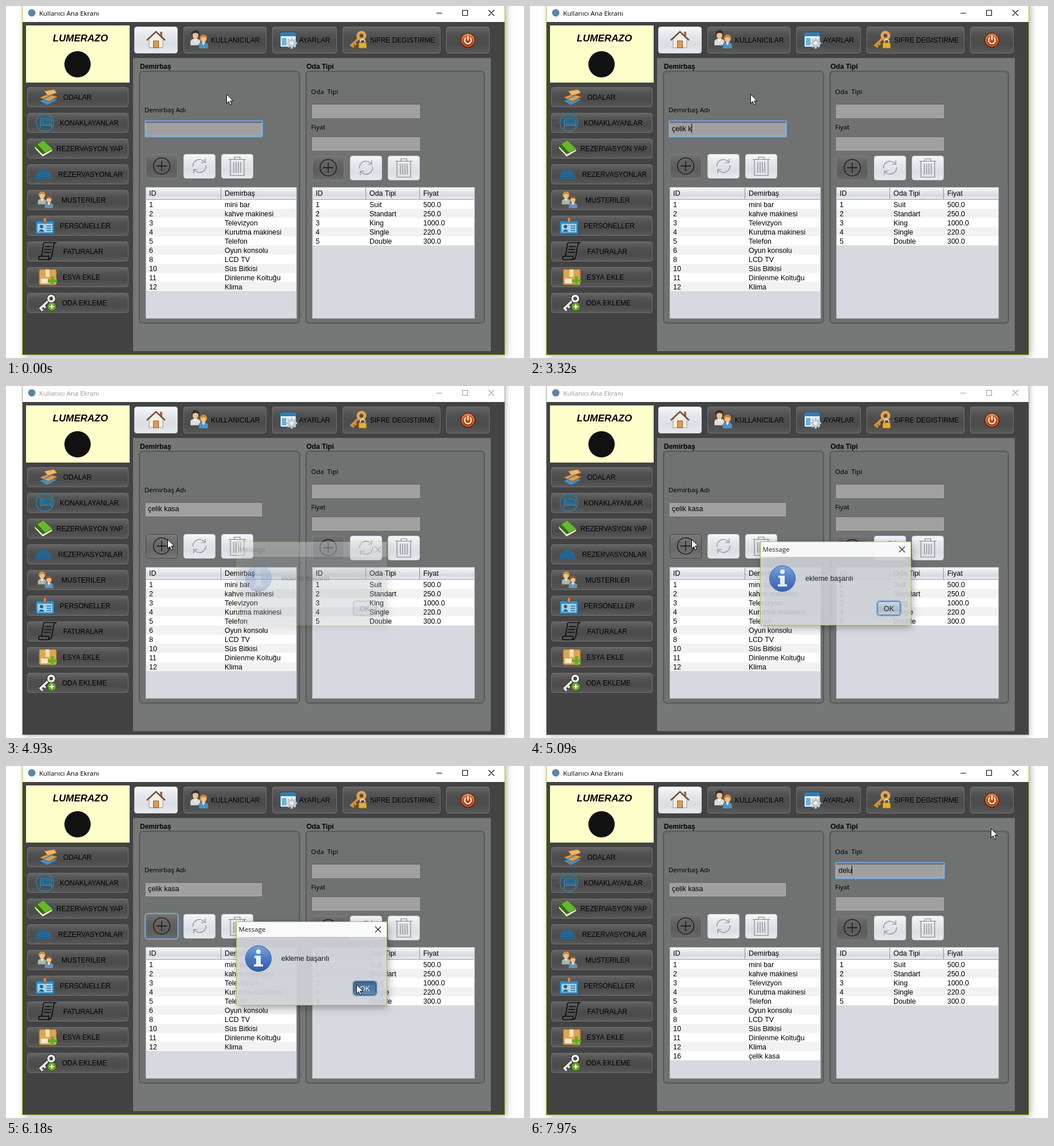
These frames come from a looping animation (905x616 px, 8 s). An HTML page with a canvas:

```html
<!DOCTYPE html>
<html lang="tr">
<head>
<meta charset="utf-8">
<title>Kullanıcı Ana Ekranı</title>
<style>
  html, body { margin: 0; width: 100%; height: 100%; overflow: hidden; background: #fff; }
  canvas { display: block; }
</style>
</head>
<body>
<canvas id="stage" width="905" height="616"></canvas>
<script>
const ctx = document.getElementById('stage').getContext('2d');
const LOOP = 8000, STEP = 78, PHASE = 20;
const ARIAL = '"Liberation Sans", Arial, sans-serif';
const BUTTON_FONT = '12px ' + ARIAL, TABLE_FONT = '12.4px ' + ARIAL, BOLD = 'bold 12px ' + ARIAL;
const LABEL_FONT = '11.4px "Noto Sans", sans-serif', TITLE_FONT = '11.5px "Open Sans", sans-serif';

// ---------- drawing helpers ----------
function text(str, x, y, font = TABLE_FONT, color = '#000') {
  ctx.font = font;
  ctx.fillStyle = color;
  ctx.fillText(str, x, y);
}
function rect(x, y, w, h, color) {
  ctx.fillStyle = color;
  ctx.fillRect(x, y, w, h);
}
function frame(x, y, w, h, color) {
  ctx.strokeStyle = color;
  ctx.lineWidth = 1;
  ctx.strokeRect(x + .5, y + .5, w - 1, h - 1);
}
function path(d, fill, stroke, width = 1) {
  const p = new Path2D(d);
  if (fill) { ctx.fillStyle = fill; ctx.fill(p); }
  if (stroke) { ctx.strokeStyle = stroke; ctx.lineWidth = width; ctx.stroke(p); }
}
function circle(x, y, r, fill, stroke, width) {
  path(`M${x - r} ${y}a${r} ${r} 0 1 1 ${2 * r} 0a${r} ${r} 0 1 1 ${-2 * r} 0z`, fill, stroke, width);
}
function rounded(x, y, w, h, r, fill, stroke, width = 1) {
  ctx.beginPath();
  ctx.roundRect(x, y, w, h, r);
  if (fill) { ctx.fillStyle = fill; ctx.fill(); }
  if (stroke) { ctx.strokeStyle = stroke; ctx.lineWidth = width; ctx.stroke(); }
}
function shade(y, h, ...colors) {
  const g = ctx.createLinearGradient(0, y, 0, y + h);
  colors.forEach((c, i) => g.addColorStop(i / (colors.length - 1), c));
  return g;
}
function at(x, y, draw) {
  ctx.save();
  ctx.translate(x, y);
  draw();
  ctx.restore();
}

// ---------- widgets ----------
const SKINS = {
  dark: [['#666', '#505050', '#4b4b4b', '#5a5a5a'], '#727272'],
  tool: [['#747474', '#626262', '#5d5d5d', '#6a6a6a'], '#808080'],
  hover: [['#7c7c7c', '#6d6d6d', '#686868', '#767676'], '#484848'],
  light: [['#f7f8fa', '#e5e7ec', '#dbdee4', '#e8eaef'], '#cfd2d8'],
  primary: [['#dbe3ee', '#b2c1d2', '#a8b9cc', '#cad7e5'], '#4a6484'],
  pressed: [['#31557c', '#3f6a98', '#426f9e', '#5c8bb8'], '#1c3450']
};
function button(x, y, w, h, skin = 'dark') {
  const [colors, edge] = SKINS[skin];
  rounded(x + .5, y + .5, w - 1, h - 1, 4, shade(y, h, ...colors), edge);
}
function focusRing(x, y, w, h, r) {
  rounded(x - 1, y - 1, w + 2, h + 2, r, null, '#75a3d0', 2);
}
function field(x, y, w, focused) {
  rect(x, y, w, 25, '#a0a0a0');
  frame(x, y, w, 25, '#b0b2b0');
  rect(x, y, w, 1, '#5e615f');
  rect(x, y + 1, w, 1, '#8b8d8b');
  if (focused) focusRing(x, y - 1, w, 26, 1);
}
function typed(str, x, baseline, caret) {
  text(str, x, baseline);
  if (caret) rect(Math.round(x + ctx.measureText(str).width), baseline - 13, 1, 16, '#000');
}
function group(x, w, title) {
  rounded(x + 1, 114, w - 2, 441, 6, '#6f7271', '#585b59', 2);
  rounded(x + 2.5, 115.5, w - 5, 438, 5, null, '#676a68');
  text(title, x + 2, 110, BOLD);
}
function table(x, w, columns, rows) {
  rect(x, 317, w, 230, '#d6d9e0');
  rect(x, 317, w, 22, shade(317, 22, '#fafbfc', '#e6e8ec', '#d7dae0', '#eef0f3'));
  rows.forEach((_, i) => rect(x, 339 + 16 * i, w, 16, i % 2 ? '#f2f2f2' : '#fff'));
  columns.forEach(([dx, title], c) => {
    if (c) rect(x + dx - 1, 318, 1, 21, '#8e929b');
    text(title, x + dx + 6, 332);
    rows.forEach((row, i) => text(row[c], x + dx + 6, 352 + 16 * i));
  });
  rect(x, 338, w, 1, '#969aa2');
  frame(x, 317, w, 230, '#c3c6cc');
}
function tools(x, y, skin, focused) {
  button(x, y, 56, 43, skin);
  button(x + 66, y, 56, 43, 'light');
  button(x + 132, y, 56, 43, 'light');
  if (focused) focusRing(x, y, 56, 43, 5);
  at(x + 28, y + 21, () => {
    circle(0, 0, 14.3, null, '#111', 1.3);
    path('M-9 0H9M0 -9V9', null, '#111', 1.3);
  });
  at(x + 94, y + 21, () => {
    path('M-11.5 1A11.5 11.5 0 0 1 9 -7M11.5 -1A11.5 11.5 0 0 1 -9 7M10 -13V-6H3M-10 13V6H-3', null, '#888', 1.2);
  });
  at(x + 160, y + 21, () => {
    path('M-15 -11.500H15M-5 -12V-15.500H5V-12M-12 -11V16.500H12V-11M-6 -7V12M-2 -7V12M2 -7V12M6 -7V12', null, '#858585', 1.2);
  });
}

// ---------- icons ----------
function person(x, y, hair, coat, s = 1) {
  at(x, y, () => {
    ctx.scale(s, s);
    path('M-9 17V10Q-8 5 0 5Q8 5 9 10V17Z', coat, '#555', .6);
    path('M-3 5L0 11L3 5Z', '#f4f4f4');
    circle(0, -3, 7, hair);
    path('M-5 -3Q0 -7 5 -3V1Q3 6 0 6Q-3 6 -5 1Z', '#f0bf8f');
  });
}
function plusBadge(x, y) {
  circle(x, y, 7.5, '#6aa323', '#355b10', .8);
  path(`M${x - 4} ${y}h8M${x} ${y - 4}v8`, null, '#fff', 2);
}
function drawTopIcons() {
  path('M269 45h4v9h-4z', '#9b6b4d');
  path('M250 58L262 46L274 58V73H250Z', '#f5eee4', '#9c9489');
  path('M246 60L262 45L278 60', null, '#71523e', 2.6);
  path('M257.500 61h9v12h-9z', '#e09a55', '#8c5a2e');

  person(331, 52, '#34302d', '#dcddde');
  person(345, 59, '#c78a3c', '#4b95c6', .9);

  rounded(479, 46, 28, 26, 2, '#f2f5f7', '#1f4e6f', 1.5);
  rect(480, 47, 26, 6, '#2f7faf');
  rect(482, 56, 8, 13, '#6bb1d8');
  for (let i = 0; i < 8; i++) at(499, 65, () => {
    ctx.rotate(i * Math.PI / 4);
    rect(-2, -9.5, 4, 5, '#c3c8cb');
  });
  circle(499, 65, 5, '#eceeef', '#c3c8cb', 3.5);

  path('M617 56L602 70M604 68l4 4M608 64l4 4', null, '#d9912f', 4);
  circle(621, 52, 6, null, '#e8a548', 5);
  path('M619 65V61Q623 55 627 61V65', null, '#d5d5d5', 2);
  rounded(616, 64, 14, 10, 1, '#e4ae35', '#80571a');

  circle(807, 60, 12.5, shade(47, 26, '#e08a50', '#c04d18', '#8f300a'), '#5f240c', 1.5);
  circle(807, 60, 10.5, null, '#eba274', .8);
  path('M803.500 55.500A5.800 5.800 0 1 0 810.500 55.500M807 52V60', null, '#fff', 2);
}
function drawSideIcons() {
  path('M58 166L76 159L90 164L72 174Z', '#4c8db5', '#27587a');
  path('M59 160L74 154L90 159L74 167Z', '#e79c46', '#8d5824');
  path('M67 149L84 146L89 152L73 157Z', '#f0b668', '#a66a2f');
  path('M65 163L80 156', null, '#4c8db5', 2);

  circle(68, 204, 15.5, null, '#2f7b9f', 1.8);
  path('M60 195V213M60 209H80V213', null, '#2f7b9f', 2);
  path('M63 198Q70 195 80 199V207H63Z', '#286884', '#2f7b9f', 1.5);

  path('M50 245V249L64 264L81 254V250L64 259Z', '#e8e6d7', '#34501d');
  path('M50 245L65 235L81 250L64 259Z', '#68b72e', '#3e7917');
  path('M50 245L55 242L69 257L64 259Z', '#3b6c18');

  path('M52 300Q53 287 65 287Q78 287 79 300Z', '#28658f');
  path('M50 302H81', null, '#28658f', 2.5);
  circle(65, 285, 2, '#28658f');

  person(63, 333, '#c79143', '#a9b7a5', .85);
  person(75, 340, '#8a5a34', '#6d93b3', .82);

  rounded(52, 376, 32, 23, 2, '#2e8fc7', '#1d5b80');
  rect(55, 381, 26, 15, '#9ed0ea');
  circle(62, 386, 3, '#2e5f7e');
  path('M57 395Q62 387 67 395Z', '#2e5f7e');
  path('M71 385h8M71 389h8M71 393h8', null, '#2e6e96', 1.6);
  rounded(65.500, 370, 5, 9, 2, '#e1813d', '#8a451b');

  path('M67 414H87Q83 416 83 421L80 438Q79 444 73 444H58Q55 440 59 438H75Q74 442 76 444M67 414Q65 415 65 420L62 438M68 421H80M67 426H79M66 431H78', null, '#0b0b0b', 1.6);

  rounded(58, 461, 30, 27, 2, '#dda64f', '#9c6a26');
  rect(69, 461, 7, 13, '#f4dfb0');
  rect(61, 477, 12, 8, '#f2ead8');
  path('M81 473v16M73 481h16', null, '#62ad2c', 5);

  path('M76 514L59 530M60 529l4 4M65 524l4 4', null, '#222', 6);
  path('M76 514L59 530M60 529l4 4M65 524l4 4', null, '#e6e6e6', 4);
  circle(79, 512, 5, null, '#222', 6);
  circle(79, 512, 5, null, '#ededed', 4);
  plusBadge(80, 526);
}

// ---------- data ----------
const SIDE = [['ODALAR', 100], ['KONAKLAYANLAR', 94], ['REZERVASYON YAP', 88], ['REZERVASYONLAR', 91],
  ['MUSTERILER', 97], ['PERSONELLER', 94], ['FATURALAR', 100], ['ESYA EKLE', 99], ['ODA EKLEME', 98]];
const ITEMS = [['1', 'mini bar'], ['2', 'kahve makinesi'], ['3', 'Televizyon'], ['4', 'Kurutma makinesi'],
  ['5', 'Telefon'], ['6', 'Oyun konsolu'], ['8', 'LCD TV'], ['10', 'Süs Bitkisi'],
  ['11', 'Dinlenme Koltuğu'], ['12', 'Klima']];
const ROOMS = [['1', 'Suit', '500.0'], ['2', 'Standart', '250.0'], ['3', 'King', '1000.0'],
  ['4', 'Single', '220.0'], ['5', 'Double', '300.0']];

const ITEM_TYPING = [[0, ''], [1610, 'ç'], [1670, 'çe'], [1840, 'çel'], [1990, 'çeli'], [2230, 'çelik'],
  [2310, 'çelik '], [2630, 'çelik a'], [3000, 'çelik '], [3320, 'çelik k'], [3400, 'çelik ka'],
  [3470, 'çelik kas'], [3550, 'çelik kasa']];
const ROOM_TYPING = [[0, ''], [7590, 'd'], [7670, 'de'], [7750, 'del'], [7970, 'delu']];
const POINTER = [[3686, 385, 154], [4232, 253, 290], [4388, 253, 290], [4544, 282, 268], [5168, 282, 268],
  [5636, 612, 382], [6182, 612, 382], [6494, 575, 216], [6728, 584, 163], [7118, 584, 163], [7196, 660, 163],
  [7274, 660, 163], [7352, 888, 73], [7430, 888, 73], [7508, 805, 109]];

// ---------- timing ----------
const clamp = v => Math.max(0, Math.min(1, v));
const between = (t, a, b) => t >= a && t < b;
const latest = (keys, t) => keys.findLast(k => t >= k[0])[1];
function pointerAt(t) {
  const i = POINTER.findIndex(k => k[0] > t);
  if (i === 0) return POINTER[0].slice(1);
  if (i < 0) return POINTER.at(-1).slice(1);
  const [t0, x0, y0] = POINTER[i - 1], [t1, x1, y1] = POINTER[i];
  const k = (t - t0) / (t1 - t0);
  return [x0 + (x1 - x0) * k, y0 + (y1 - y0) * k];
}

// ---------- scene ----------
function drawWindow(active) {
  rect(0, 0, 905, 616, '#fff');
  ctx.save();
  ctx.shadowColor = active ? 'rgba(0,0,0,.32)' : 'rgba(0,0,0,.22)';
  ctx.shadowBlur = active ? 11 : 8;
  ctx.shadowOffsetX = 3;
  ctx.shadowOffsetY = 3;
  rect(29, -20, 842, 630, '#fff');
  ctx.restore();
  rect(29, 28, 842, 582, '#434343');
  frame(28, -2, 844, 613, active ? '#a9c52f' : '#a5a5a5');
  const ink = active ? '#000' : '#999';
  circle(45, 12, 6.5, '#5c86a8');
  text('Kullanıcı Ana Ekranı', 58, 17, TITLE_FONT, ink);
  path('M752 12.500h10M797.500 7.500h9v9h-9zM843 7l10 10M853 7l-10 10', null, ink, 1.1);
}
function drawBrand() {
  rect(35, 34, 181, 100, '#ffffcb');
  ctx.textAlign = 'center';
  text('LUMERAZO', 130, 62, 'italic bold 17px ' + ARIAL);
  ctx.textAlign = 'left';
  circle(125, 102, 23, '#111');
}
function drawNavigation() {
  button(224, 36, 76, 47, 'light');
  [[310, 145], [465, 113], [588, 171], [769, 76]].forEach(([x, w]) => button(x, 36, w, 47));
  text('KULLANICILAR', 358, 64, BUTTON_FONT);
  text('AYARLAR', 512, 64, BUTTON_FONT);
  text('SIFRE DEGISTIRME', 636, 64, BUTTON_FONT);
  SIDE.forEach(([label, x], i) => {
    button(37, 142 + 45 * i, 177, 35);
    text(label, x, 164 + 45 * i, BUTTON_FONT);
  });
  drawTopIcons();
  drawSideIcons();
}
function drawDialog(alpha, pressed) {
  ctx.save();
  ctx.globalAlpha = alpha;
  ctx.save();
  ctx.shadowColor = 'rgba(0,0,0,.4)';
  ctx.shadowBlur = 13;
  ctx.shadowOffsetX = 2;
  ctx.shadowOffsetY = 4;
  rect(403, 273, 262, 145, '#d6d9df');
  ctx.restore();
  rect(403, 273, 262, 26, '#fff');
  frame(402, 272, 264, 147, '#a9c52f');
  text('Message', 406.5, 290, TITLE_FONT);
  path('M645 281l10 10M655 281l-10 10', null, '#000', 1.1);
  circle(441, 337, 22.500, shade(314, 46, '#6f9ee0', '#3a70c4', '#1f4fa3'), '#2a519a');
  circle(441, 325, 4, '#fff');
  path('M434 332h11v15h4v4h-16v-4h4v-11h-3z', '#fff');
  text('ekleme başarılı', 481, 341);
  button(607, 377, 40, 24, pressed ? 'pressed' : 'primary');
  focusRing(607, 377, 40, 24, 5);
  text('OK', 618, 394, TABLE_FONT, pressed ? '#fff' : '#000');
  ctx.restore();
}
function drawPointer(x, y) {
  at(Math.round(x) + .5, Math.round(y) + .5, () =>
    path('M0 0V16L3.700 12.600L6.300 18.500L8.800 17.400L6.200 11.600H11.300Z', '#fff', '#000'));
}

function draw(t) {
  const sampled = Math.floor((t - PHASE) / STEP) * STEP + PHASE;
  const active = !between(t, 4870, 6180);
  const [px, py] = pointerAt(sampled);
  const hover = between(px, 244, 300) && between(py, 259, 302);
  const itemCaret = between(t, 370, 840) || between(t, 1300, 4000) || between(t, 4470, 4710);
  const roomCaret = between(t, 6960, 7430) || t >= 7590;

  drawWindow(active);
  drawBrand();
  drawNavigation();
  rect(222, 91, 625, 513, '#757877');
  group(232, 282, 'Demirbaş');
  group(523, 314, 'Oda Tipi');

  text('Demirbaş Adı', 242, 186, LABEL_FONT);
  text('Oda  Tipi', 533, 154, LABEL_FONT);
  text('Fiyat', 533, 216, LABEL_FONT);
  field(244, 203, 203, t < 4710);
  field(535, 171, 188, t >= 6960);
  field(535, 228, 188, false);
  typed(latest(ITEM_TYPING, t), 248, 219, itemCaret);
  typed(latest(ROOM_TYPING, t), 539, 187, roomCaret);

  const ring = between(t, 4710, 4870) || between(t, 6180, 6960);
  tools(244, 259, hover ? 'hover' : 'tool', ring);
  tools(535, 262, 'tool', false);
  table(244, 264, [[0, 'ID'], [132, 'Demirbaş']], t >= 6260 ? [...ITEMS, ['16', 'çelik kasa']] : ITEMS);
  table(535, 284, [[0, 'ID'], [94, 'Oda Tipi'], [188, 'Fiyat']], ROOMS);

  if (between(t, 4870, 6340)) {
    const alpha = t < 6120 ? clamp((sampled - 4780) / 360) : clamp((6320 - sampled) / 240);
    drawDialog(alpha, t >= 6030);
  }
  drawPointer(px, py);
}

const start = performance.now();
function tick() {
  draw((performance.now() - start) % LOOP);
  requestAnimationFrame(tick);
}
tick();
</script>
</body>
</html>
```
